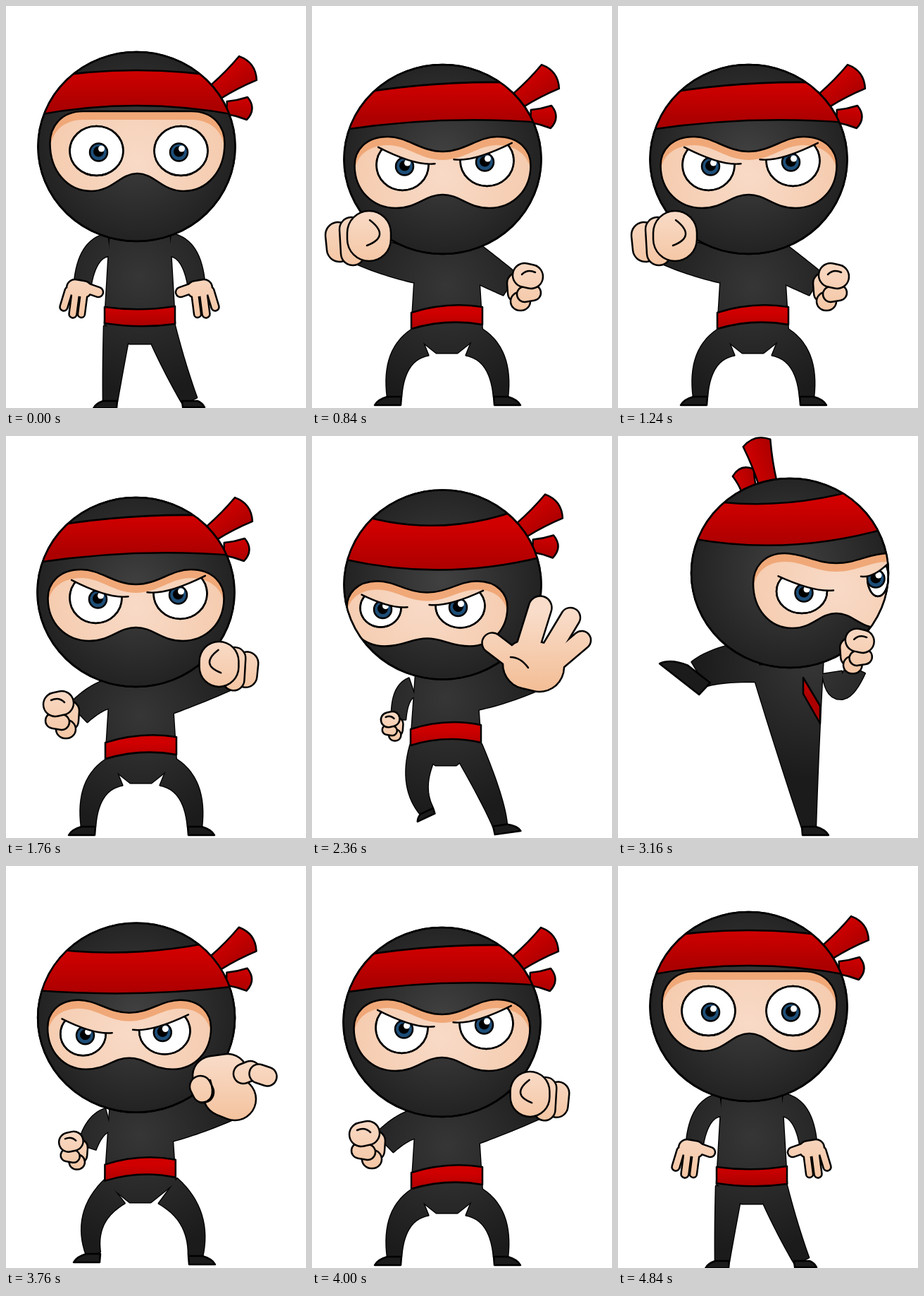
Write an HTML page with a canvas that moves like this. It is 426x569 px and loops after 6000 ms.

```html
<!DOCTYPE html>
<html lang="en">
<head>
<meta charset="utf-8">
<title>Ninja</title>
<style>
html, body { margin: 0; width: 100%; height: 100%; overflow: hidden; background: #fff; }
canvas { display: block; }
</style>
</head>
<body>
<canvas></canvas>
<script>
const canvas = document.querySelector('canvas'), ctx = canvas.getContext('2d');
const W = 426, H = 569, LOOP = 6000, LINE = 2.5, RX = 140, RY = 134;
const lerp = (a, b, k) => a + (b - a) * k;

// Blends numbers inside arrays and objects; anything else switches halfway.
function mix(a, b, k) {
  if (typeof a === 'number') return lerp(a, b, k);
  if (Array.isArray(a)) return a.map((v, i) => mix(v, b[i], k));
  if (typeof a === 'object') return Object.fromEntries(Object.keys(a).map(n => [n, mix(a[n], b[n], k)]));
  return k < .5 ? a : b;
}

// Hands: groups of capsules [x1, y1, x2, y2, width]; each group shares one outline.
const HANDS = {
  open: [[[-10, -6, 2, -4, 24], [-19, -2, -26, 21, 11], [-9, 0, -13, 31, 11], [3, 0, -1, 31, 10], [6, -6, 23, 0, 14]]],
  fist: [[[-29, -6, -27, 14, 36]], [[-10, -14, -8, 20, 34]], [[15, -9, 15, 0, 62]]],
  small: [[[-11, -6, -10, 8, 28]], [[-7, 20, -5, 20, 26]], [[0, 10, 12, 8, 22]], [[0, -17, 9, -15, 34]]],
  palm: [[[-12, 28, 5, 32, 70], [-20, 30, -62, -2, 29], [-14, 12, 6, -52, 33], [14, 20, 49, -38, 28], [20, 32, 65, -6, 26]]],
  claw: [[[-5, 12, 10, 18, 60], [-22, -15, 0, -18, 56]], [[-39, 0, -35, 8, 30]], [[22, -18, 32, -22, 28]], [[44, -18, 56, -14, 27]]]
};
// Thumb folds: start, control, end.
const FOLDS = {
  fist: [16, -27, 46, -4, 12, 9],
  small: [-4, -18, 4, -26, 15, -21],
  palm: [-36, 18, -22, 18, -11, 33],
  claw: [-25, -9, -15, 22, -39, 23]
};

// Head parts are relative to the head's centre.
// limb: start, bend, end, two half widths; a leg adds foot turn and toe size.
const idle = {
  head: [185.5, 199],
  tails: [[113, -78, 158, -111, 12, 21], [128, -55, 157, -54, 9, 16]],
  band: [-96, -108, -96, -45, -58, -45],
  face: [1, 124, -50, -50, 63, 38],
  eyes: [[-57, 6, 38, 35], [63, 6, 38, 35]],
  anger: 0,
  torso: [140, 240, 478],
  belt: [426, 425, 5],
  arms: [[146, 338, 116, 342, 109, 392, 16, 12], [233, 338, 263, 342, 270, 392, 16, 12]],
  legs: [[158, 455, 152, 510, 148, 559, 19, 10, 0, -.85], [219, 455, 238, 510, 261, 559, 21, 11, 0, .75]],
  hands: [['open', 108, 405, 1], ['open', 271, 405, -1]]
};
const jabL = {
  head: [185.5, 217],
  tails: [[108, -84, 153, -117, 12, 21], [125, -61, 154, -60, 9, 16]],
  band: [-90, -107, -107, -42, -55, -52],
  face: [0, 125, -32, -11, 69, 50],
  eyes: [[-57, 8, 37, 36], [63, 2, 38, 36]],
  anger: 1,
  torso: [141, 242, 491],
  belt: [434, 426, -8],
  arms: [[150, 368, 110, 360, 72, 345, 24, 22], [225, 360, 255, 378, 281, 394, 26, 18]],
  legs: [[157, 474, 115, 491, 117, 553, 22, 10, 0, -1], [227, 474, 269, 491, 268, 553, 22, 10, 0, 1]],
  hands: [['fist', 66, 330, 1], ['small', 302, 398, 1]]
};
const jabR = {
  ...jabL,
  head: [184.5, 221],
  arms: [[150, 364, 128, 368, 103, 392, 20, 18], [225, 364, 265, 354, 318, 335, 31, 23]],
  hands: [['small', 79, 395, -1], ['fist', 316, 327, -.9]]
};
const hands = (pose, ...list) => ({ ...pose, hands: list });
const ready = hands(jabR, jabR.hands[0], ['fist', 323, 327, -.9]);
const punchL = hands(jabL, ['fist', 50, 330, 1.05], jabL.hands[1]);
const punchR = hands(jabR, jabR.hands[0], ['fist', 325, 327, -1.05]);
const palm = {
  ...idle,
  head: [185.5, 210.5],
  band: [-106, -84, -119, -36, -21, -39],
  face: [-22, 114, -5, 11, 87, 76],
  eyes: [[-88, 33, 29, 27], [25, 30, 35, 31]],
  anger: 1,
  torso: [140, 240, 466],
  belt: [415, 409, -9],
  arms: [[142, 356, 124, 362, 123, 401, 14, 10], [225, 356, 265, 350, 315, 330, 33, 30]],
  legs: [[158, 445, 139, 496, 163, 531, 20, 10, -25, -.65], [223, 445, 259, 518, 267, 551, 20, 10, -8, 1]],
  hands: [['small', 114, 411, -.62], ['palm', 318, 295, 1]]
};
const claw = {
  ...hands(mix(ready, palm, .6), ['small', 96, 403, -.8], ['claw', 315, 312, 1]),
  tails: palm.tails,
  face: [-10, 116, -25, -7, 73, 57],
  legs: [[155, 460, 110, 495, 124, 549, 22, 10, 0, -1], [230, 460, 276, 494, 269, 552, 22, 10, 0, 1]]
};
const turn = {
  head: [244, 194],
  tails: [[-31, -126, -47, -184, 13, 20], [-58, -118, -66, -142, 11, 16]],
  band: [-106, -100, -132, -49, -40, -64],
  face: [66, 118, -28, -14, 78, 57],
  eyes: [[17, 26, 36, 31], [125, 6, 15, 27]],
  anger: 1,
  torso: [263, 287, 415],
  belt: [342, 382, 0],
  arms: [[240, 330, 242, 340, 244, 350, 10, 10], [304, 335, 312, 385, 338, 330, 14, 14]],
  legs: [[200, 318, 140, 322, 115, 337, 30, 20, 38, -1.9], [240, 320, 254, 437, 271, 553, 52, 10, 0, 1]],
  hands: [['small', 244, 300, 0], ['small', 339, 305, .95]]
};
const kick = {
  ...turn,
  legs: [[225, 340, 310, 430, 390, 315, 34, 18, -120, 1.6], turn.legs[1]]
};

const timeline = [
  [0, idle], [360, mix(idle, ready, .5)], [440, ready],
  [600, jabL], [680, punchL], [840, jabL], [920, jabR], [1000, punchR],
  [1160, jabR], [1240, jabL], [1320, punchL], [1760, jabR], [1840, ready],
  [2120, mix(ready, claw, .33)], [2200, mix(ready, claw, .67)], [2280, claw], [2360, palm],
  [2640, mix(palm, turn, .33)], [2720, mix(palm, turn, .67)], [2800, turn], [2880, kick],
  [3160, turn], [3240, mix(turn, palm, .33)], [3320, mix(turn, palm, .67)], [3400, palm],
  [3760, claw], [3840, mix(claw, ready, .33)], [3920, mix(claw, ready, .67)], [4000, ready],
  [4760, mix(ready, idle, .5)], [4840, idle]
];

function gradient(g, from, to) {
  g.addColorStop(0, from);
  g.addColorStop(1, to);
  return g;
}
const radial = (x, y, r, from, to) => gradient(ctx.createRadialGradient(x, y, 0, x, y, r), from, to);
const red = (top, bottom) => gradient(ctx.createLinearGradient(0, top, 0, bottom), '#d00000', '#ac0000');

function paint(path, fill) {
  if (fill) {
    ctx.fillStyle = fill;
    ctx.fill(path);
  }
  ctx.stroke(path);
}
function within(path, job) {
  ctx.save();
  ctx.clip(path);
  job();
  ctx.restore();
}
function placed(x, y, job) {
  ctx.save();
  ctx.translate(x, y);
  job();
  ctx.restore();
}
function ellipse(x, y, rx, ry = rx) {
  const p = new Path2D();
  p.ellipse(x, y, rx, ry, 0, 0, 7);
  return p;
}

// Tapered shape along a quadratic curve.
function limb([x0, y0, x1, y1, x2, y2, w0, w1]) {
  const left = [], right = [];
  for (let t = 0; t <= 1; t += 1 / 16) {
    const ax = lerp(x0, x1, t), ay = lerp(y0, y1, t), bx = lerp(x1, x2, t), by = lerp(y1, y2, t);
    const x = lerp(ax, bx, t), y = lerp(ay, by, t), k = lerp(w0, w1, t) / Math.hypot(bx - ax, by - ay);
    left.push([x + (by - ay) * k, y - (bx - ax) * k]);
    right.unshift([x - (by - ay) * k, y + (bx - ax) * k]);
  }
  return new Path2D('M' + [...left, ...right].join('L') + 'Z');
}

function drawTail([x0, y0, x1, y1, w0, w1]) {
  const len = Math.hypot(x1 - x0, y1 - y0);
  ctx.save();
  ctx.translate(x0, y0);
  ctx.rotate(Math.atan2(y1 - y0, x1 - x0));
  const w = (w0 + w1) * .43;
  paint(new Path2D(`M0 ${-w0}Q${len / 2} ${-w} ${len} ${-w1}Q${len + 14} 0 ${len} ${w1}Q${len / 2} ${w} 0 ${w0}Z`), red(-w1, w1));
  ctx.restore();
}

function drawBody({ head, torso: [l, r, low], belt: [yl, yr, bend], arms, legs }) {
  const top = head[1] + 115, side = (r - l) * .35;
  const trunk = new Path2D(`M${l + 8} ${top}L${r - 8} ${top}L${r} ${low - 28}L${r - side} ${low}L${l + side} ${low}L${l} ${low - 28}Z`);
  const parts = [trunk, ...arms.map(limb), ...legs.map(limb)];
  // All outlines first, so the fills merge into one figure.
  ctx.lineWidth = LINE * 1.1;
  parts.forEach(p => ctx.stroke(p));
  ctx.lineWidth = LINE;
  ctx.fillStyle = radial((l + r) / 2, low - 95, 165, '#363636', '#1b1b1b');
  parts.forEach(p => ctx.fill(p));

  for (const [, , , , x, y, , w, turn, toe] of legs) {
    const k = Math.abs(toe), s = Math.sign(toe);
    ctx.save();
    ctx.translate(x, y);
    ctx.rotate(turn * Math.PI / 180);
    ctx.scale(s, 1);
    paint(new Path2D(`M${-w} 0L${w} 0Q${24 * k} ${4 * k} ${28 * k} ${12 * k}L${-w * .9} ${12 * k}Z`), '#1b1b1b');
    ctx.restore();
  }
  const mid = (yl + yr) / 2 + bend * 1.5;
  paint(new Path2D(`M${l} ${yl}Q${(l + r) / 2} ${mid} ${r} ${yr}V${yr + 25}Q${(l + r) / 2} ${mid + 24} ${l} ${yl + 23}Z`), red(yl, yl + 26));
}

function faceShape([cx, w, top, dip, low, nose]) {
  const h = low - top, m = top + h * .4, x = k => cx + w * k;
  const p = new Path2D();
  for (const s of [1, -1]) {
    p.moveTo(cx, dip);
    p.bezierCurveTo(x(.25 * s), dip, x(.4 * s), top, x(.62 * s), top);
    p.bezierCurveTo(x(.88 * s), top, x(s), m - h * .2, x(s), m);
    p.bezierCurveTo(x(s), m + h * .35, x(.8 * s), low, x(.53 * s), low);
    p.bezierCurveTo(x(.28 * s), low, x(.2 * s), nose, cx, nose);
  }
  return p;
}

// The brow is a slanting curve that cuts off the top of the eye.
function drawEye([cx, cy, rx, ry], s, anger) {
  const lift = (1 - anger) * 2 * ry;
  const ox = -s * .93 * rx, oy = -.7 * ry - lift, ix = s * (rx + 9), iy = -.05 * ry - lift;
  const brow = `${ox} ${oy}Q${s * rx * .5} ${.05 * ry - lift} ${ix} ${iy}`;
  placed(cx, cy, () => {
    within(new Path2D(`M${ox - s * 20} ${oy - 12}L${brow}V${3 * ry}H${ox - s * 20}Z`), () => {
      const eye = ellipse(0, 0, rx, ry);
      paint(eye, '#fff');
      within(eye, () => placed(s * 3, 2, () => {
        paint(ellipse(0, 0, 12.5), '#1d4e78');
        ctx.fillStyle = '#000';
        ctx.fill(ellipse(0, -1, 7.5));
        ctx.fillStyle = '#fff';
        ctx.fill(ellipse(4, -5, 4.5));
      }));
      ctx.stroke(eye);
    });
    if (anger > .7) ctx.stroke(new Path2D('M' + brow));
  });
}

function drawHead({ band: [tl, tm, tr, bl, bm, br], face, eyes, anger }) {
  const skull = ellipse(0, 0, RX, RY), shape = faceShape(face);
  paint(skull, radial(0, -5, 150, '#414141', '#202020'));
  within(skull, () => {
    paint(new Path2D(`M${-RX} ${tl}Q0 ${2 * tm - (tl + tr) / 2} ${RX} ${tr}V${br}Q0 ${2 * bm - (bl + br) / 2} ${-RX} ${bl}Z`), red(tm, bm));
    ctx.fillStyle = '#f0a878';
    ctx.fill(shape);
    within(shape, () => placed(0, 12, () => {
      ctx.fillStyle = radial(face[0], 10, 130, '#f8dac7', '#f5cbae');
      ctx.fill(shape);
    }));
    ctx.stroke(shape);
    eyes.forEach((eye, i) => drawEye(eye, i ? -1 : 1, anger));
  });
  ctx.stroke(skull);
}

function drawHand([kind, x, y, size]) {
  const k = Math.abs(size);
  if (k < .05) return;
  ctx.save();
  ctx.translate(x, y);
  ctx.scale(size, k);
  const skin = gradient(ctx.createLinearGradient(0, -45, 0, 60), '#f9dcc9', '#f3bf98');
  for (const group of HANDS[kind]) {
    for (const [color, grow] of [['#000', LINE / k], [skin, -LINE / k]]) {
      ctx.strokeStyle = color;
      for (const [x1, y1, x2, y2, w] of group) {
        ctx.lineWidth = w + grow;
        ctx.stroke(new Path2D(`M${x1} ${y1}L${x2} ${y2}`));
      }
    }
  }
  if (FOLDS[kind]) {
    const [a, b, ...rest] = FOLDS[kind];
    ctx.strokeStyle = '#000';
    ctx.lineWidth = LINE / k;
    ctx.stroke(new Path2D(`M${a} ${b}Q${rest.join(' ')}`));
  }
  ctx.restore();
}

function draw(pose) {
  ctx.fillStyle = '#fff';
  ctx.fillRect(0, 0, W, H);
  ctx.strokeStyle = '#000';
  ctx.lineWidth = LINE;
  ctx.lineJoin = ctx.lineCap = 'round';
  placed(...pose.head, () => [...pose.tails].reverse().forEach(drawTail));
  drawBody(pose);
  placed(...pose.head, () => drawHead(pose));
  pose.hands.forEach(drawHand);
}

const dpr = window.devicePixelRatio || 1;
canvas.width = W * dpr;
canvas.height = H * dpr;
canvas.style.width = W + 'px';
canvas.style.height = H + 'px';
ctx.scale(dpr, dpr);

const start = performance.now();
let shown;
function tick() {
  const t = (performance.now() - start) % LOOP;
  const pose = timeline.filter(([at]) => at <= t).pop()[1];
  if (pose !== shown) draw(shown = pose);
  requestAnimationFrame(tick);
}
tick();
</script>
</body>
</html>
```
